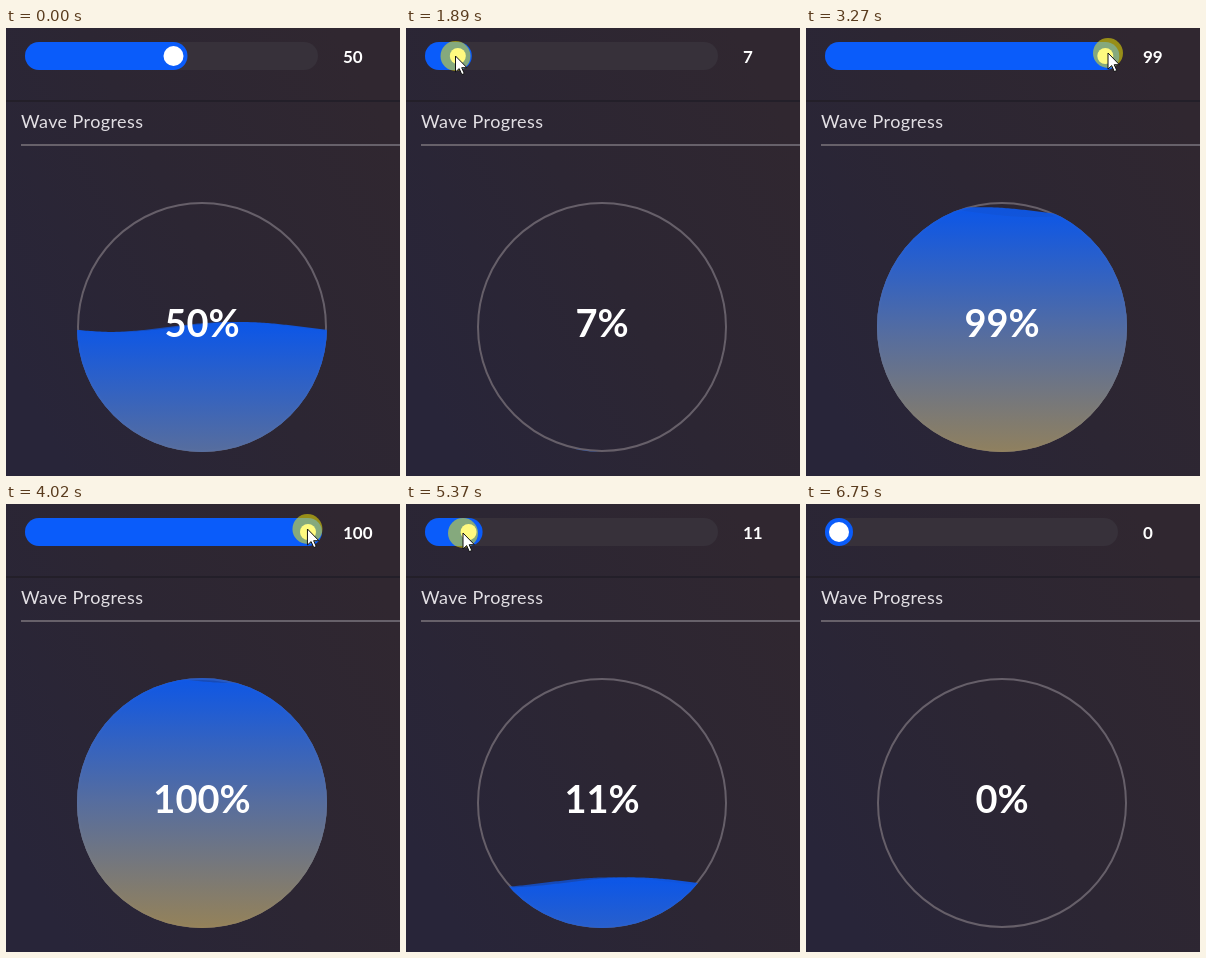
Animation of 394 by 448 pixels, one loop 6980 ms. Source, as an HTML page with a canvas:

```html
<!DOCTYPE html>
<html lang="en">
<head>
<meta charset="utf-8">
<title>Wave Progress</title>
<style>
  html, body { margin: 0; width: 100%; height: 100%; overflow: hidden; background: #2b2635; }
  canvas { display: block; }
</style>
</head>
<body>
<canvas id="stage" width="394" height="448"></canvas>
<script>
const ctx = document.getElementById('stage').getContext('2d');
const W = 394, H = 448, LOOP = 6980, STEP = 30, LAST = 6750;
const TAU = Math.PI * 2;
const FONT = 'Lato, "Open Sans", sans-serif';
const gauge = { x: 196, y: 299, r: 125 };
const slider = { x: 19, y: 14, w: 293, h: 28 };

// [time, value]
const valueKeys = [
  [640, 50], [870, 26], [1250, 0], [1780, 0], [1890, 7], [2160, 18.5],
  [3100, 94], [3270, 99], [3330, 100], [4050, 100], [4530, 72],
  [5370, 11], [5560, 0]
];
// [time, x, y]
const pointerKeys = [
  [30, 372, 440], [600, 167, 26], [660, 163, 25], [870, 95, 27],
  [1250, 15, 28], [1740, 15, 28], [1890, 49.5, 28], [2160, 83, 27],
  [3100, 286, 26], [3270, 302, 25], [3450, 312, 25], [3800, 312, 25],
  [4050, 300, 25], [4530, 224, 24.5], [5370, 57, 29], [5600, 15, 29],
  [5980, 15, 30], [6480, 236, 313], [6720, 342, 440]
];
const PRESS = 620, RELEASE = 5900;

function sample(keys, t, col = 1) {
  if (t <= keys[0][0]) return keys[0][col];
  for (let i = 1; i < keys.length; i++) {
    const a = keys[i - 1], b = keys[i];
    if (t <= b[0]) return a[col] + (b[col] - a[col]) * (t - a[0]) / (b[0] - a[0]);
  }
  return keys[keys.length - 1][col];
}

// The water follows the slider with a short delay.
function waterValue(t) {
  let sum = 0;
  for (let i = 0; i < 20; i++) sum += sample(valueKeys, t - 10 * i - 5);
  return sum / 20;
}

function disc(x, y, r, color) {
  ctx.fillStyle = color;
  ctx.beginPath();
  ctx.arc(x, y, r, 0, TAU);
  ctx.fill();
}

function pill(x, y, w, h, color) {
  ctx.fillStyle = color;
  ctx.beginPath();
  ctx.roundRect(x, y, w, h, h / 2);
  ctx.fill();
}

function label(str, x, y, weight, size, color, align = 'left', gap = 0) {
  ctx.font = `${weight} ${size}px ${FONT}`;
  ctx.letterSpacing = gap + 'px';
  ctx.textAlign = align;
  ctx.fillStyle = color;
  ctx.fillText(str, x, y);
}

function drawPanel() {
  const bg = ctx.createLinearGradient(0, 330, W, 120);
  bg.addColorStop(0, '#282539');
  bg.addColorStop(0.5, '#2c2633');
  bg.addColorStop(1, '#302730');
  ctx.fillStyle = bg;
  ctx.fillRect(0, 0, W, H);
  ctx.fillStyle = '#231f29';
  ctx.fillRect(0, 72, W, 2);
  ctx.fillStyle = '#67616a';
  ctx.fillRect(15, 116, W - 15, 2);
  label('Wave Progress', 15, 100, 400, 18, '#e2dfe4', 'left', 0.4);
}

function drawSlider(value, pressed) {
  const thumb = slider.x + 14 + 2.69 * value, mid = slider.y + 14;
  pill(slider.x, slider.y, slider.w, slider.h, '#37313a');
  pill(slider.x, slider.y, thumb + 14 - slider.x, slider.h, '#0a5cfa');
  disc(thumb, mid, pressed ? 8 : 10, '#fff');
  label(value, 337, 35, 700, 17, '#fff');
}

function drawWave(level, crest, alpha) {
  ctx.globalAlpha = alpha;
  ctx.beginPath();
  ctx.moveTo(60, H);
  for (let x = 60; x <= 332; x += 2) {
    ctx.lineTo(x, level - 5 * Math.cos((x - crest) / 250 * TAU));
  }
  ctx.lineTo(332, H);
  ctx.fill();
  ctx.globalAlpha = 1;
}

function drawGauge(t, value) {
  const { x, y, r } = gauge;
  ctx.strokeStyle = '#665f69';
  ctx.lineWidth = 2;
  ctx.beginPath();
  ctx.arc(x, y, r - 1, 0, TAU);
  ctx.stroke();

  const fill = waterValue(t);
  const level = y + r - 2.5 * fill + 6 * Math.max(0, 1 - fill / 4);
  const paint = ctx.createLinearGradient(0, level, 0, level + 250);
  paint.addColorStop(0, '#0d58ea');
  paint.addColorStop(0.5, '#586fa0');
  paint.addColorStop(1, '#97845a');

  ctx.save();
  ctx.beginPath();
  ctx.arc(x, y, r, 0, TAU);
  ctx.clip();
  ctx.fillStyle = paint;
  drawWave(level, 225 - 0.19 * t, 0.72);
  drawWave(level, 235 - 0.095 * t, 0.92);
  ctx.restore();

  label(value + '%', x, 309, 700, 38, '#fff', 'center');
}

const arrow = new Path2D('M0 0V16L3.7 12.6L6.3 18.6L8.8 17.5L6.2 11.7H11.4Z');

function drawPointer(t, pressed) {
  if (t < 30 || t >= 6740) return;
  const x = sample(pointerKeys, t, 1), y = sample(pointerKeys, t, 2);
  if (pressed) disc(x, y, 15, 'rgba(255, 245, 0, 0.5)');
  ctx.save();
  ctx.translate(x, y);
  ctx.fillStyle = '#fff';
  ctx.strokeStyle = '#111';
  ctx.lineWidth = 1;
  ctx.fill(arrow);
  ctx.stroke(arrow);
  ctx.restore();
}

function draw(t) {
  const value = Math.round(sample(valueKeys, t));
  const pressed = t >= PRESS && t < RELEASE;
  drawPanel();
  drawSlider(value, pressed);
  drawGauge(t, value);
  drawPointer(t, pressed);
}

const start = performance.now();
function tick() {
  const t = (performance.now() - start) % LOOP;
  draw(Math.min(LAST, Math.floor(t / STEP) * STEP));
  requestAnimationFrame(tick);
}
tick();
</script>
</body>
</html>
```
